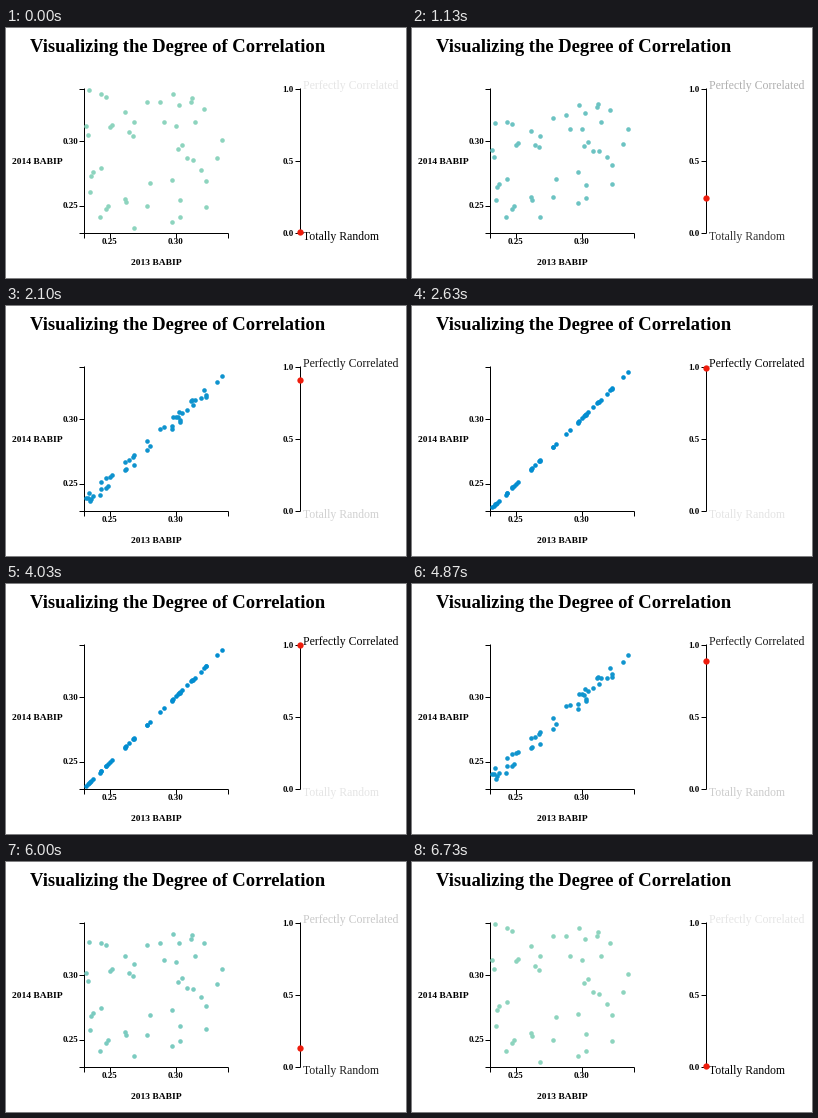
Recreate the animation shown at these times as a matplotlib script. Size 400x250 px, loop 6760 ms.

```python
import numpy as np
import matplotlib.pyplot as plt
from matplotlib.animation import FuncAnimation

W, H, DPI = 400, 250, 100
PX = 72 / DPI                      # points per pixel
LOOP, STEP = 6760, 20              # ms
RISE, FALL, TRAVEL = -40, 3963, 3000

MINT = np.array([141, 212, 190]) / 255
BLUE = np.array([2, 141, 208]) / 255
RED = "#ee1c0c"

# uncorrelated positions of the points, in pixels
POINTS = np.array([
    (83, 62), (94.5, 65.5), (100, 69), (119, 84), (127.5, 94), (123, 103.5),
    (127, 107.5), (80.3, 97.5), (82, 107), (105.5, 96.5), (104, 98.5),
    (140.5, 74), (154, 74), (166.5, 65.5), (173, 77), (186, 70), (185, 73.5),
    (198, 81), (158, 94), (170, 98), (188.5, 94.5), (216, 112.5), (211, 130),
    (176, 117), (172, 121), (181, 130), (186.5, 132), (194.5, 142),
    (200, 153.5), (94.5, 139.5), (87, 144), (84.5, 147.5), (83.5, 163.5),
    (144, 155), (165.5, 152.5), (118.5, 171), (120, 174.5), (102, 177.5),
    (99.5, 181), (93.5, 189.5), (141, 178), (174, 172.5), (200, 179.5),
    (173.5, 189.5), (166, 194), (127.5, 200),
])
xs, loose = POINTS.T
tight = 282 - xs                   # the line y = x on the chart's scale

fig = plt.figure(figsize=(W / DPI, H / DPI), dpi=DPI, facecolor="white")
ax = fig.add_axes([0, 0, 1, 1])
ax.set(xlim=(0, W), ylim=(H, 0))
ax.axis("off")


def label(x, y, text, size, weight="bold", ha="left"):
    return ax.text(x, y, text, family="Liberation Serif", weight=weight,
                   size=size * PX, ha=ha, va="baseline", color="black")


def line(x, y):
    ax.plot(x, y, color="black", lw=PX, solid_capstyle="butt")


def vertical_axis(x, ticks, ends=(60.5, 204.5)):
    line([x, x], [ends[0] - 0.5, ends[1] + 0.5])
    for y in {*ends, *ticks}:
        line([x - 5, x], [y, y])
    for y, text in ticks.items():
        label(x - 5.5, y + 3, text, 9, ha="right")


def horizontal_axis(y, ticks, ends=(77.5, 221.5)):
    line([ends[0] - 0.5, ends[1] + 0.5], [y, y])
    for x in {*ends, *ticks}:
        line([x, x], [y, y + 5])
    for x, text in ticks.items():
        label(x + 0.5, y + 11.5, text, 9, ha="center")


label(23.7, 24.3, "Visualizing the Degree of Correlation", 18.6)
label(5.8, 136.3, "2014 BABIP", 9.5)
label(150, 236.8, "2013 BABIP", 9.5, ha="center")
vertical_axis(77.5, {112.5: "0.30", 177.5: "0.25"})
horizontal_axis(204.5, {103.5: "0.25", 169.5: "0.30"})
vertical_axis(293.5, {60.5: "1.0", 132.5: "0.5", 204.5: "0.0"})
perfect = label(297, 60.6, "Perfectly Correlated", 11.77, "normal")
chance = label(297, 211.6, "Totally Random", 11.77, "normal")

dots = ax.scatter(xs, loose, s=(4.6 * PX) ** 2, lw=0, zorder=3)
knob = ax.scatter([293.5], [204], s=(6.3 * PX) ** 2, lw=0, color=RED, zorder=4)


def ease(u):
    u = min(max(u, 0), 1)
    return 4 * u ** 3 if u < 0.5 else 1 - 4 * (1 - u) ** 3


def correlation(t):
    return ease((t - RISE) / TRAVEL) - ease((t - FALL) / TRAVEL)


def draw(i):
    r = correlation((i + 0.5) * STEP)
    dots.set_offsets(np.column_stack([xs, loose + r * (tight - loose)]))
    dots.set_facecolor(MINT + r * (BLUE - MINT))
    knob.set_offsets([(293.5, 204 - 143 * r)])
    perfect.set_alpha(0.1 + 0.9 * r)
    chance.set_alpha(1 - 0.9 * r)
    return dots, knob, perfect, chance


anim = FuncAnimation(fig, draw, frames=LOOP // STEP, interval=STEP,
                     repeat=True, repeat_delay=0)
plt.show()
```
